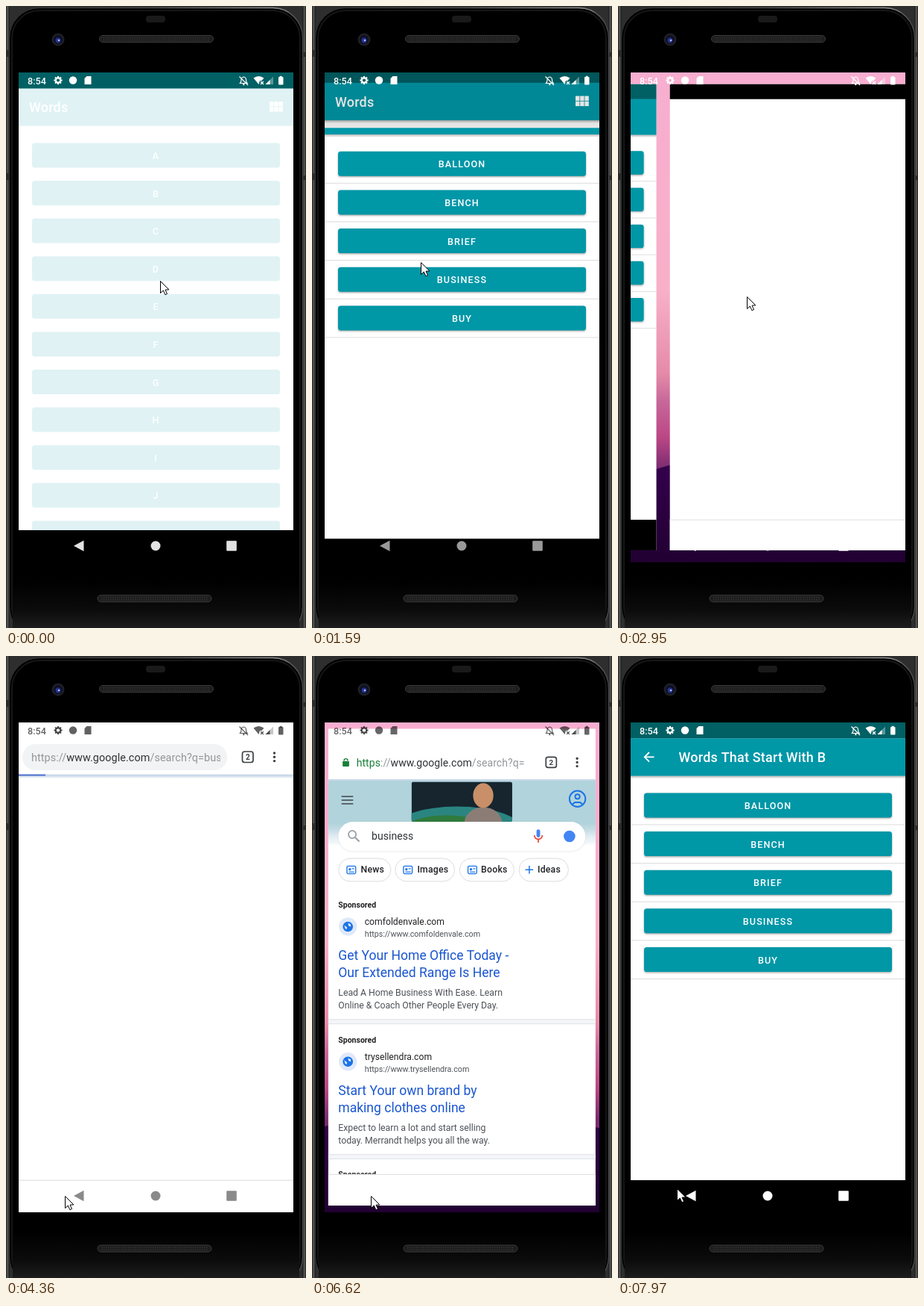
Recreate the animation shown at these times as an HTML page with a canvas. Size 403 by 833 pixels, loop 8000 ms.

```html
<!DOCTYPE html>
<html lang="en">
<head>
<meta charset="utf-8">
<title>Words</title>
<style>
html, body { margin: 0; width: 100%; height: 100%; overflow: hidden; background: #000; }
canvas { display: block; width: 403px; height: 833px; }
</style>
</head>
<body>
<canvas id="stage"></canvas>
<script>
const W = 403, H = 833, LOOP = 8000;
const SX = 17, SY = 89, SW = 369, SH = 656;
const TEAL = '#0097a7', DEEP = '#006064', BLUE = '#1a73e8';
const canvas = document.getElementById('stage');
const dpr = window.devicePixelRatio || 1;
canvas.width = W * dpr;
canvas.height = H * dpr;
const c = canvas.getContext('2d');

// Bursts of motion: [first step, last step, number of steps]
const BURSTS = [[120, 630, 5], [900, 1870, 8], [1990, 2950, 8], [3090, 4090, 8],
  [4210, 4360, 2], [5150, 5390, 3], [5820, 6860, 9], [6990, 7260, 3], [7970, 7970, 1]];
const CURSOR = [[0, 207, 368], [780, 207, 368], [1180, 197, 256], [1330, 192, 256],
  [1590, 146, 343], [1870, 148, 351], [2400, 166, 358], [2600, 168, 362],
  [2950, 173, 389], [3150, 165, 430], [3900, 79, 723], [7250, 79, 723]];
const PROGRESS = [[4200, 20], [4360, 36], [5150, 60], [5390, 100], [5820, 122], [6080, 369]];

const clamp = v => Math.max(0, Math.min(1, v));
const ramp = (t, a, b) => clamp((t - a) / (b - a));
const easeOut = (v, e) => 1 - Math.pow(1 - clamp(v), e);

function snap(t) {
  let now = 0;
  for (const [a, b, n] of BURSTS) {
    if (t < a) break;
    const step = n > 1 ? (b - a) / (n - 1) : 1;
    now = a + Math.min(n - 1, Math.floor((t - a + 6) / step)) * step;
  }
  return now;
}

function track(keys, t, k) {
  let i = 0;
  while (i < keys.length - 2 && t >= keys[i + 1][0]) i++;
  const p = keys[i], q = keys[i + 1];
  return p[k] + (q[k] - p[k]) * ramp(t, p[0], q[0]);
}

function rect(x, y, w, h, fill) {
  c.fillStyle = fill;
  c.fillRect(x, y, w, h);
}

function round(x, y, w, h, r, fill, stroke, lw = 1) {
  c.beginPath();
  c.roundRect(x, y, w, h, r);
  if (fill) { c.fillStyle = fill; c.fill(); }
  if (stroke) { c.strokeStyle = stroke; c.lineWidth = lw; c.stroke(); }
}

function oval(x, y, rx, ry, fill) {
  c.beginPath();
  c.ellipse(x, y, rx, ry, 0, 0, 7);
  c.fillStyle = fill;
  c.fill();
}

const disc = (x, y, r, fill) => oval(x, y, r, r, fill);

function ring(x, y, r, color, lw, from = 0, to = 7) {
  c.beginPath();
  c.arc(x, y, r, from, to);
  c.strokeStyle = color;
  c.lineWidth = lw;
  c.stroke();
}

function poly(pts, fill) {
  c.beginPath();
  pts.forEach(([x, y]) => c.lineTo(x, y));
  c.closePath();
  c.fillStyle = fill;
  c.fill();
}

function line(pts, color, lw) {
  c.beginPath();
  pts.forEach(([x, y], i) => i ? c.lineTo(x, y) : c.moveTo(x, y));
  c.strokeStyle = color;
  c.lineWidth = lw;
  c.stroke();
}

// y is the middle of the capitals
function text(str, x, y, size, color, weight = 400, align = 'left', gap = 0) {
  c.font = `${weight} ${size}px Roboto, sans-serif`;
  c.textAlign = align;
  c.letterSpacing = gap + 'px';
  c.fillStyle = color;
  c.fillText(str, x, y + size * 0.36);
  const w = c.measureText(str).width;
  c.letterSpacing = '0px';
  return w;
}

function fade(x0, y0, x1, y1, stops) {
  const g = c.createLinearGradient(x0, y0, x1, y1);
  stops.forEach(([p, col]) => g.addColorStop(p, col));
  return g;
}

function clipTo(x, y, w, h, draw) {
  c.save();
  c.beginPath();
  c.rect(x, y, w, h);
  c.clip();
  draw();
  c.restore();
}

function speaker(x, y) {
  round(x, y, 153, 9, 4.5, '#1d1d1d', '#3c3c3c');
  for (let i = 0; i < 48; i++)
    for (let j = 0; j < 2; j++) rect(x + 5 + i * 3, y + 2.5 + j * 3, 1.4, 1.4, '#383838');
}

function phone() {
  rect(0, 0, W, H, '#2e2e2e');
  rect(0, 0, 5, H, fade(0, 0, 5, 0, [[0, '#1c1c1c'], [0.4, '#5c5c5c'], [1, '#161616']]));
  rect(398, 0, 5, H, fade(398, 0, 403, 0, [[0, '#161616'], [0.6, '#5c5c5c'], [1, '#1c1c1c']]));
  for (const y of [59, 224]) {
    rect(0, y, 5, 9, '#2a2a2a');
    rect(398, y + 3, 5, 6, '#2a2a2a');
  }
  round(4.5, 2.5, 394, 842, [40, 40, 40, 40], '#000', fade(0, 0, W, 0,
    [[0, '#2c2c2c'], [0.5, '#4a4a4a'], [0.9, '#909090'], [1, '#3a3a3a']]), 1.5);
  round(8, 6, 387, 836, [37, 37, 36, 36], null, '#161616', 2);
  rect(9, 770, 385, 63, fade(0, 770, 0, 833, [[0, '#000'], [0.6, '#0b0b0b'], [1, '#1d1d1d']]));
  round(188, 13, 26, 9, 4, '#1a1a1a');
  speaker(125.5, 39.5);
  speaker(123, 789);
  disc(70, 45, 8.5, '#1f1f25');
  disc(70, 45, 6, '#0e1028');
  disc(70, 46, 3.4, '#26348c');
  disc(71, 46, 1.3, '#aebcff');
}

function wallpaper() {
  rect(SX, SY, SW, SH, fade(0, SY, 0, 620, [[0, '#f7aed0'], [0.55, '#f8b0c8'],
    [0.76, '#e58aa8'], [0.83, '#c7679a'], [0.92, '#bb4785'], [1, '#7a2b70']]));
  poly([[17, 630], [52, 620], [69, 615], [200, 628], [294, 616], [386, 632], [386, 745], [17, 745]],
    fade(0, 615, 0, 745, [[0, '#34004c'], [1, '#210032']]));
}

function statusIcons(col) {
  text('8:54', 29, 100, 12.6, col, 500);
  for (let i = 0; i < 8; i++) {
    const a = i * Math.PI / 4;
    line([[70 + 3 * Math.cos(a), 99.5 + 3 * Math.sin(a)],
      [70 + 5.6 * Math.cos(a), 99.5 + 5.6 * Math.sin(a)]], col, 2.2);
  }
  ring(70, 99.5, 3.2, col, 2.2);
  disc(90, 99.5, 5.2, col);
  poly([[108.5, 94], [114.5, 94], [114.5, 105], [105.5, 105], [105.5, 97]], col);
  c.beginPath();
  c.moveTo(314.5, 103.5);
  c.quadraticCurveTo(316, 102, 316, 99);
  c.quadraticCurveTo(316, 95.5, 319.3, 95);
  c.quadraticCurveTo(322.5, 95.5, 322.5, 99);
  c.quadraticCurveTo(322.5, 102, 324, 103.5);
  c.closePath();
  c.strokeStyle = col;
  c.lineWidth = 1.2;
  c.stroke();
  disc(319.3, 105, 1.2, col);
  line([[313.5, 94.5], [325, 106]], col, 1.2);
  c.beginPath();
  c.moveTo(339.5, 105);
  c.lineTo(332.5, 96.5);
  c.quadraticCurveTo(339.5, 91.5, 346.5, 96.5);
  c.lineTo(343.5, 100);
  c.lineTo(341, 100);
  c.closePath();
  c.fillStyle = col;
  c.fill();
  line([[342, 101], [346, 105]], col, 1.2);
  line([[346, 101], [342, 105]], col, 1.2);
  c.save();
  c.globalAlpha *= 0.35;
  poly([[359, 94.5], [359, 105], [348.5, 105]], col);
  c.restore();
  poly([[354.5, 99], [354.5, 105], [348.5, 105]], col);
  round(366, 95, 6.5, 10.5, 1, col);
  rect(367.7, 93.8, 3, 2, col);
}

function navIcons(col) {
  poly([[91, 723], [104.5, 715.7], [104.5, 730.3]], col);
  disc(201, 723, 6.5, col);
  round(296.2, 716.2, 13.6, 13.6, 1, col);
}

function button(label, y, alpha) {
  c.save();
  c.globalAlpha = alpha;
  if (alpha > 0.9) {
    c.shadowColor = 'rgba(0,0,0,.35)';
    c.shadowBlur = 2.5;
    c.shadowOffsetY = 1.2;
  }
  round(35, y, 333, 33, 3.6, TEAL);
  c.restore();
  text(label, 201.5, y + 17, 12.57, '#fff', 500, 'center', 1.12);
}

function appBar(alpha) {
  rect(SX, SY, SW, 21.5, DEEP);
  c.globalAlpha = alpha;
  rect(SX, 110.3, SW, 50.3, TEAL);
  c.globalAlpha = 1;
  if (alpha > 0.9) rect(SX, 160.6, SW, 4, fade(0, 160.6, 0, 164.6,
    [[0, 'rgba(0,0,0,.28)'], [1, 'rgba(0,0,0,0)']]));
}

function lettersPage(alpha) {
  rect(SX, SY, SW, SH, '#fff');
  appBar(alpha);
  text('Words', 31, 136, 17.95, '#fff', 500, 'left', 0.22);
  for (let i = 0; i < 6; i++)
    rect(354 + (i % 3) * 6.2, 128 + Math.floor(i / 3) * 7.2, 5.4, 6.4, '#fff');
  [...'ABCDEFGHIJK'].forEach((ch, i) => button(ch, 183.4 + i * 50.6, alpha));
  rect(SX, 702, SW, 43, '#000');
}

function wordsPage() {
  rect(SX, SY, SW, SH, '#fff');
  appBar(1);
  line([[48.5, 135.3], [36, 135.3]], '#fff', 1.8);
  line([[42, 129], [35.7, 135.3], [42, 141.6]], '#fff', 1.8);
  text('Words That Start With B', 81.6, 136, 17.95, '#fff', 500, 'left', 0.22);
  ['BALLOON', 'BENCH', 'BRIEF', 'BUSINESS', 'BUY'].forEach((word, i) => {
    button(word, 183.4 + i * 51.65, 1);
    rect(SX, 225.4 + i * 51.65, SW, 1, '#dcdcdc');
  });
  rect(SX, 702, SW, 43, '#000');
}

function addressBar(t, moving) {
  const secure = t >= 5140;
  const gray = '#92979b';
  if (!moving) round(22, 118, 275, 35, 17.5, '#f1f3f4');
  if (secure) {
    round(37, 133.5, 9, 7.5, 1, '#188038');
    ring(41.5, 133, 2.6, '#188038', 1.4, Math.PI, 2 * Math.PI);
  }
  clipTo(30, 115, 258, 40, () => {
    let x = secure ? 56 : 34;
    const parts = [['https', secure ? '#188038' : gray], ['://', gray],
      ['www.google.com', '#303236'], ['/search?q=business', gray]];
    for (const [s, col] of parts) x += text(s, x, 136, 14.4, col, 400, 'left', 0.07);
  });
  round(317.5, 128, 14.5, 14.5, 3, null, '#3c4043', 1.7);
  text('2', 324.8, 135.3, 10, '#3c4043', 700, 'center');
  for (const y of [130, 135.3, 140.6]) disc(360.5, y, 1.7, '#3c4043');
  if (t >= 4200) rect(SX, 158.5, SW, 5.5, fade(0, 158.5, 0, 164,
    [[0, '#c6d5e8'], [0.4, '#cddbea'], [0.7, '#e6edf4'], [1, '#fff']]));
}

function doodle() {
  c.save();
  c.beginPath();
  c.roundRect(132, 162, 139, 55, 3);
  c.clip();
  rect(132, 162, 139, 55, '#16252e');
  oval(195, 228, 90, 32, '#2a8580');
  oval(180, 232, 62, 24, '#2f7a3c');
  oval(231, 219, 26, 22, '#8b7d76');
  oval(231, 181, 14, 17, '#c98f68');
  c.restore();
}

function searchHeader(t) {
  rect(SX, 160.5, SW, 90, fade(0, 160, 0, 250,
    [[0, '#b1d3db'], [0.66, '#b1d3db'], [0.76, '#c6dde5'], [0.86, '#e2ecf2'], [0.96, '#f3f7fa'], [1, '#fff']]));
  for (const y of [182.3, 187.3, 192.3]) rect(35.5, y - 0.8, 16, 1.6, '#444b50');
  ring(361, 185.5, 11, BLUE, 2);
  ring(361, 182.5, 3.2, BLUE, 2);
  line([[354, 193], [357.5, 190.4], [364.5, 190.4], [368, 193]], BLUE, 2);
  doodle();
  c.save();
  c.shadowColor = 'rgba(60,64,67,.16)';
  c.shadowBlur = 2;
  c.shadowOffsetY = 0.6;
  round(31, 217, 341, 40.5, 20.2, '#fff');
  c.restore();
  ring(50.3, 234.5, 5.2, '#9a9fa3', 1.8);
  line([[54, 238.3], [60, 244.3]], '#9a9fa3', 2.1);
  text('business', 77, 236.7, 14.4, '#303236', 400, 'left', 0.05);
  round(304.5, 227.5, 5, 11, 2.5, '#4285f4');
  ring(307, 235.5, 5.5, '#ea4335', 1.8, 0, Math.PI);
  line([[307, 241], [307, 245.5]], '#ea4335', 1.8);
  disc(350, 237, 8, '#4285f4');
}

function chips(icons) {
  [['News', 31, 73, 62], ['Images', 109, 83, 140], ['Books', 198, 76, 228], ['Ideas', 280, 69, 306]]
    .forEach(([name, x, w, tx], i) => {
      round(x + 0.5, 267.5, w - 1, 31.5, 15.7, '#fff', '#dadce0');
      text(name, tx, 282.6, 12.57, '#202124', 500, 'left', 0.22);
      if (i < 3 && icons) {
        round(x + 12, 278, 12, 10.5, 1.5, null, BLUE, 1.4);
        rect(x + 14.5, 281, 3, 3, BLUE);
        rect(x + 19, 281, 3, 1.2, BLUE);
        rect(x + 14.5, 285.5, 7.5, 1.2, BLUE);
      }
    });
  rect(289, 282.3, 11, 1.5, BLUE);
  rect(293.8, 277.5, 1.5, 11, BLUE);
}

function globe(x, y) {
  disc(x, y, 12.5, '#dfe9f9');
  disc(x, y, 7, BLUE);
  poly([[x - 5, y - 2], [x - 1, y + 1], [x - 2, y + 4], [x - 4, y + 2]], '#dfe9f9');
  poly([[x, y - 5], [x + 4, y - 3], [x + 4, y], [x + 1, y - 1]], '#dfe9f9');
}

function ad(y, site, title, body) {
  text('Sponsored', 31, y, 10.8, '#202124', 700);
  if (!site) return;
  globe(44.3, y + 30.3);
  text(site, 67.4, y + 23.5, 12.5, '#202124');
  text('https://www.' + site, 67.4, y + 40, 11, '#4d5156');
  title.forEach((s, i) => text(s, 31, y + 70 + i * 23.3, 18, '#1a56d0'));
  body.forEach((s, i) => text(s, 31, y + 121 + i * 17.7, 12.6, '#4d5156'));
  rect(SX, y + 157.5, SW, 7, '#f3f5f8');
  rect(SX, y + 157.5, SW, 1, '#dfe3e8');
  rect(SX, y + 163.5, SW, 1, '#dfe3e8');
}

function results() {
  ad(331, 'comfoldenvale.com', ['Get Your Home Office Today -', 'Our Extended Range Is Here'],
    ['Lead A Home Business With Ease. Learn', 'Online & Coach Other People Every Day.']);
  ad(516.7, 'trysellendra.com', ['Start Your own brand by', 'making clothes online'],
    ['Expect to learn a lot and start selling', 'today. Merrandt helps you all the way.']);
  ad(702, '');
}

function browserPage(t, moving) {
  rect(SX, SY, SW, SH, '#fff');
  if (t < 3700) rect(SX, SY, SW, 21.3, '#000');
  if (t >= 3800) addressBar(t, moving);
  if (t >= 5380) searchHeader(t);
  if (t >= 5815) chips(t >= 6070);
  if (t >= 6070) results();
  if (t >= 4200 && t < 6070) rect(SX, 158.6, track(PROGRESS, t, 1), 1.8, '#4468cc');
  rect(SX, 702, SW, 43, '#fff');
  rect(SX, 701.6, SW, 1.2, '#e2e2e2');
}

// Draws a page scaled about the screen centre and shifted sideways
function pane(draw, dx, s) {
  c.save();
  c.translate(201.3 + dx, 416.7);
  c.scale(s, s);
  c.translate(-201.5, -417);
  clipTo(SX, SY, SW, SH, draw);
  c.restore();
}

function switchTask(t, start, back) {
  const u = (t - start) / 700;
  const move = easeOut((u - 0.15) / 0.7, 2.07);
  const s = 1 - 0.048 * ramp(u, 0, 0.25) * (1 - ramp(u, 0.72, 1));
  const p = back ? 1 - move : move;
  wallpaper();
  pane(wordsPage, -SW * p, s);
  pane(() => browserPage(t, true), SW * (1 - p), s);
}

function openWords(t) {
  const u = ramp(t, 1400, 1820);
  const p = easeOut(u, 1.4);
  c.save();
  c.translate(0, -13 * p);
  lettersPage(1);
  c.restore();
  rect(SX, SY, SW, SH, `rgba(0,0,0,${0.1 * clamp(u * 2.2)})`);
  const dy = 27 * (1 - p);
  const top = SY + dy + SH * 0.96 * Math.pow(1 - u, 3.75);
  clipTo(SX, top, SW, SH, () => {
    c.translate(0, dy);
    wordsPage();
  });
}

function screen(t) {
  let status = '#fff', nav = '#fff';
  if (t < 1400) {
    const a = 0.12 + 0.88 * ramp(t, 0, 630);
    lettersPage(a);
    nav = `rgba(255,255,255,${0.87 + 0.13 * a})`;
  } else if (t < 1820) {
    openWords(t);
    nav = 'rgba(255,255,255,.6)';
  } else if (t < 2530) {
    wordsPage();
  } else if (t < 3230) {
    switchTask(t, 2530, false);
  } else if (t < 6504) {
    browserPage(t, false);
    if (t >= 4200) {
      const k = t < 4350 ? 0.5 : 1;
      status = `rgba(0,0,0,${0.62 * k})`;
      nav = `rgba(0,0,0,${0.46 * k})`;
    }
  } else if (t < 7204) {
    switchTask(t, 6504, true);
    if (t < 7100) {
      status = 'rgba(0,0,0,.6)';
      nav = 'rgba(0,0,0,0)';
    }
  } else {
    wordsPage();
  }
  statusIcons(status);
  navIcons(nav);
}

function cursor(x, y) {
  c.save();
  c.translate(x + 0.5, y + 0.5);
  c.beginPath();
  [[0, 0], [0, 16], [3.8, 12.5], [6.4, 18.2], [9, 17], [6.5, 11.6], [11.4, 11.4]]
    .forEach(([a, b]) => c.lineTo(a, b));
  c.closePath();
  c.fillStyle = '#fff';
  c.fill();
  c.strokeStyle = '#000';
  c.lineWidth = 1;
  c.stroke();
  c.restore();
}

function draw(t) {
  c.setTransform(dpr, 0, 0, dpr, 0, 0);
  phone();
  clipTo(SX, SY, SW, SH, () => screen(t));
  if (t < 7250) cursor(track(CURSOR, t, 1), track(CURSOR, t, 2));
  else if (t >= 7970) cursor(79, 713);
}

const begin = performance.now();
function tick() {
  draw(snap((performance.now() - begin) % LOOP));
  requestAnimationFrame(tick);
}
tick();
</script>
</body>
</html>
```
